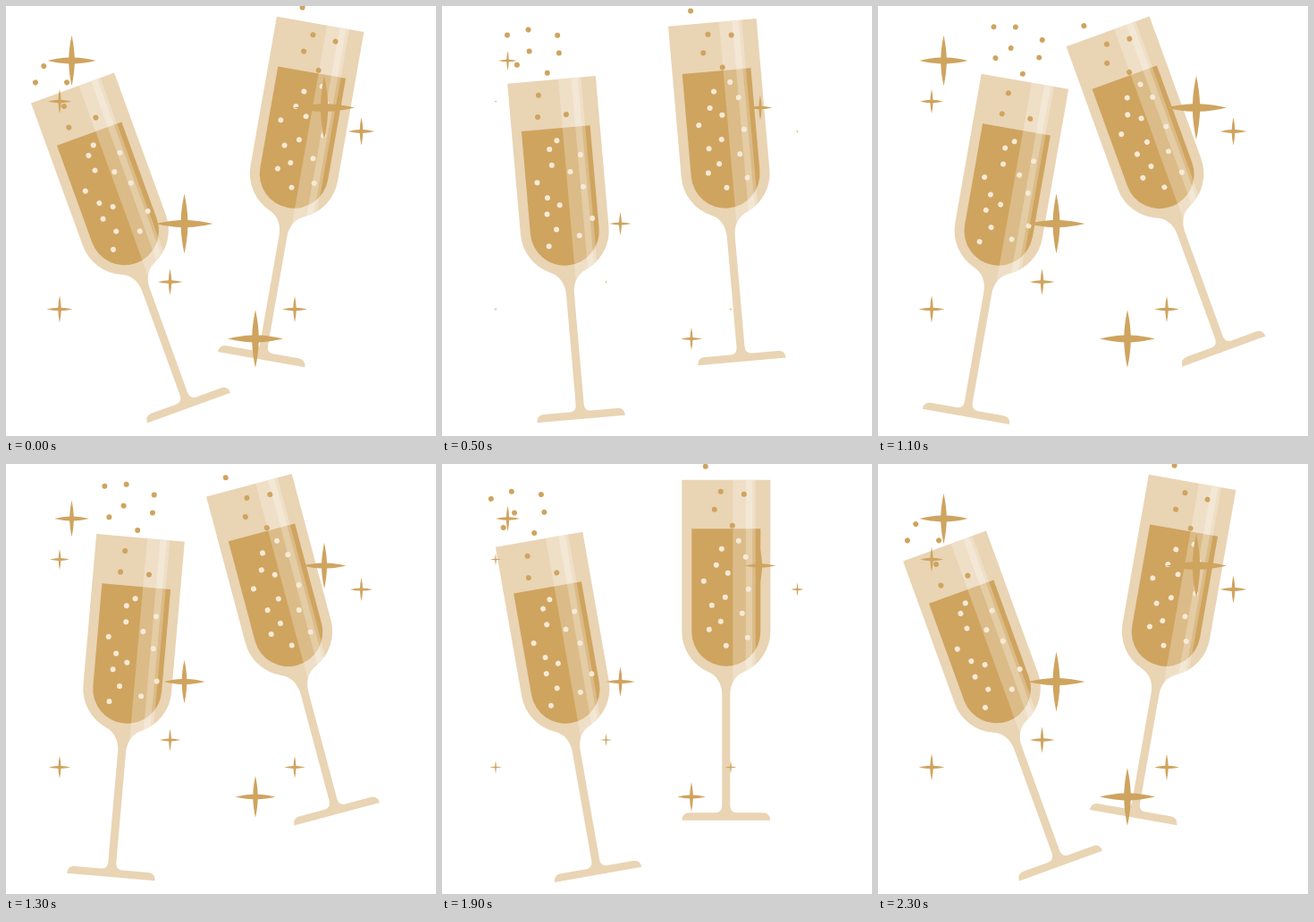
These frames come from a looping animation (481x480 px, 2400 ms). An HTML page with a canvas:

```html
<!DOCTYPE html>
<html lang="en">
<head>
<meta charset="utf-8">
<title>Champagne toast</title>
<style>
  html, body { margin: 0; width: 100%; height: 100%; overflow: hidden; background: #fff; }
  canvas { display: block; }
</style>
</head>
<body>
<canvas id="stage" width="481" height="480"></canvas>
<script>
const ctx = document.getElementById('stage').getContext('2d');
const GOLD = '#cfa45f', GLASS = '#e9d4b4', FOAM = '#f6ead7';
const STEP = 200, LAST = 6, TILT = 5;

// Glass parts, with the origin at the middle of the rim.
const glassShape = new Path2D(
  'M-49.5 0H49.5V169A49.5 49.5 0 0 1 20 214.3C10 218.5 4.5 228 4.5 240V364Q5 371.5 12 371.5' +
  'H41Q49 371.5 49.5 380H-49.5Q-49 371.5 -41 371.5H-12Q-5 371.5 -4.5 364V240' +
  'C-4.5 228 -10 218.5 -20 214.3A49.5 49.5 0 0 1 -49.5 169Z');
const liquidShape = new Path2D('M-38.5 54.5H38.5V169.5A38.5 38.5 0 0 1 -38.5 169.5Z');
const starShape = new Path2D(
  'M0-1Q.11-.5 .12-.12Q.5-.11 1 0Q.5 .11 .12 .12Q.11 .5 0 1' +
  'Q-.11 .5-.12 .12Q-.5 .11-1 0Q-.5-.11-.12-.12Q-.11-.5 0-1Z');

// Bubbles hold only their sideways offsets; drops are points in glass coordinates.
const glasses = [
  {
    x: 136.5, y: 242.5, rim: 160.7, angle: -20, turn: 1, startShift: -7,
    bubbles: [0, -9, 25, -8, 12, -26, 25, -16, -3, -18, 32, -9, 16, -19],
    drops: [[13, 40], [-19, 40], [-16, 16], [-4, -8], [-37, -20], [11, -29],
      [-22, -34], [11, -49], [-45, -54], [-21, -58]]
  },
  {
    x: 317.8, y: 195.2, rim: 177.5, angle: 10, turn: -1, startShift: 3,
    bubbles: [14, -5, 22, -11, 2, -25, 25, -1, -16, 18, -6, -19, 24, 0],
    drops: [[7, 51], [-13, 33], [20, 16], [-6, 13], [-23, -15]]
  }
];

const bigStars = [[73.5, 61, 27], [199.5, 243, 32], [356, 113.5, 34], [279, 371.5, 31]];
const smallStars = [[60, 106.5, 13], [183.5, 308, 14], [60, 338.5, 14.5],
  [397.5, 140, 15], [323, 338.5, 14]];

// Share of full size, where swing is 0 in the middle pose and 1 at either end.
const bigPulse = swing => .39 + .61 * swing ** 1.5;
const smallPulse = swing => .15 + .85 * Math.sin(swing * Math.PI / 2) ** 1.4;

function drawDot(x, y, color) {
  ctx.fillStyle = color;
  ctx.beginPath();
  ctx.arc(x, y, 3, 0, 2 * Math.PI);
  ctx.fill();
}

function drawShine(x, width) {
  ctx.fillStyle = 'rgba(255,255,255,.25)';
  ctx.fillRect(x, 0, width, 232);
}

function drawGlass(glass, pose) {
  ctx.save();
  ctx.translate(glass.x + (pose ? 0 : glass.startShift), glass.y);
  ctx.rotate((glass.angle + glass.turn * TILT * pose) * Math.PI / 180);
  ctx.translate(0, -glass.rim);
  ctx.fillStyle = GLASS;
  ctx.fill(glassShape);
  ctx.fillStyle = GOLD;
  ctx.fill(liquidShape);

  ctx.save();
  ctx.clip(glassShape);
  drawShine(7.5, 25.5);
  drawShine(22, 7.5);
  ctx.restore();

  glass.bubbles.forEach((x, i) => drawDot(x, 68 + 9 * i, FOAM));
  // The spray reaches higher once the glasses start to swing.
  const ceiling = -35 - 30 * pose;
  glass.drops.filter(([, y]) => y > ceiling).forEach(([x, y]) => drawDot(x, y, GOLD));
  ctx.restore();
}

function drawStar(x, y, r) {
  ctx.save();
  ctx.translate(x, y);
  ctx.scale(r, r * 1.05);
  ctx.fillStyle = GOLD;
  ctx.fill(starShape);
  ctx.restore();
}

function render(time) {
  // Poses swing from 0 to LAST and back in hard steps.
  const step = Math.floor(time / STEP + .5) % (2 * LAST);
  const pose = LAST - Math.abs(LAST - step);
  const swing = Math.abs(2 * pose / LAST - 1);
  ctx.fillStyle = '#fff';
  ctx.fillRect(0, 0, 481, 480);
  glasses.forEach(glass => drawGlass(glass, pose));
  bigStars.forEach(([x, y, r]) => drawStar(x, y, r * bigPulse(swing)));
  smallStars.forEach(([x, y, r]) => drawStar(x, y, r * smallPulse(swing)));
}

const start = performance.now();
function loop() {
  render(performance.now() - start);
  requestAnimationFrame(loop);
}
loop();
</script>
</body>
</html>
```
